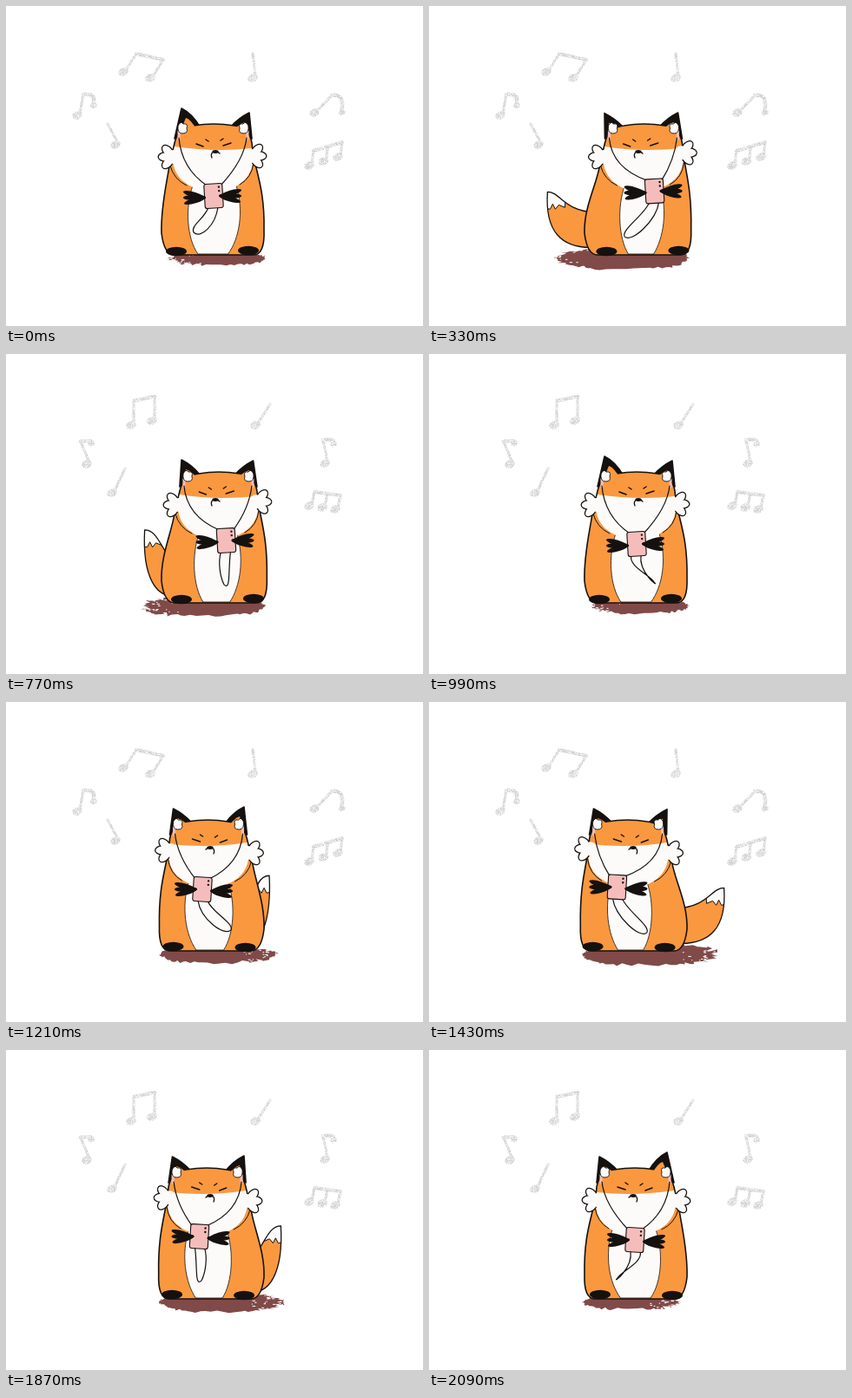
An HTML page with a canvas for the animation above (2200 ms loop, 480 by 369 pixels).

```html
<!DOCTYPE html>
<html lang="en">
<head>
<meta charset="utf-8">
<title>Fox with music</title>
<style>
html, body { margin: 0; width: 100%; height: 100%; overflow: hidden; background: #fff; }
canvas { display: block; width: 100vw; height: 100vh; }
</style>
</head>
<body>
<canvas id="stage" width="480" height="369"></canvas>
<script>
const ctx = document.getElementById('stage').getContext('2d');
const STEP = 110, STEPS = 20, HALF = 10, MIRROR = 476;
const ORANGE = '#fa983f', INK = '#15110f', WHITE = '#fcfbfa', PINK = '#f4bdbb', EARTH = '#804a49';

// One sway to the right; the second half of the loop is its mirror image.
function poseAt(k) {
  const lean = Math.sin(Math.PI * (k / 9) ** 0.9) ** 0.8 || 0;
  const swing = Math.PI * k / HALF;
  const tuftL = 187 + 9 * lean, tuftR = 288 + 9 * lean;
  return {
    lean, tuftL, tuftR,
    tuftLift: 4 * lean,
    headL: tuftL + 7, headR: tuftR - 5,
    earL: 202, earLTop: 118 + 6 * lean,
    earR: 280 + 7 * lean, earRTop: 123,
    eyes: 240 + 5 * lean, nose: 241,
    phoneX: 239 + 22 * lean, phoneY: 219 - 6 * lean,
    belly: 239 + 6 * lean, bellyW: 30 - 5 * lean,
    baseL: 180, baseR: 297 + 5 * lean,
    cordX: 238 - 22 * Math.cos(swing), cordY: 261 + 6 * Math.sin(swing),
    tailX: 215 - 84 * lean, tailY: 199 + 20 * lean ** 4,
    shadowL: 184 - 48 * lean
  };
}

function seeded(seed) {
  return () => (seed = (seed * 16807) % 2147483647) / 2147483647;
}

function paint(path, fill, stroke, width = 1.3) {
  if (typeof path === 'string') path = new Path2D(path);
  if (fill) { ctx.fillStyle = fill; ctx.fill(path); }
  if (stroke) { ctx.strokeStyle = stroke; ctx.lineWidth = width; ctx.stroke(path); }
}

function oval(x, y, rx, ry, turn = 0) {
  const path = new Path2D();
  path.ellipse(x, y, rx, ry, turn, 0, Math.PI * 2);
  return path;
}

// Chalky grey used for the notes
function makeChalk() {
  const tile = document.createElement('canvas');
  tile.width = tile.height = 64;
  const c = tile.getContext('2d'), rnd = seeded(71);
  for (let y = 0; y < 64; y++) for (let x = 0; x < 64; x++) {
    const v = Math.round(204 + 44 * rnd());
    c.fillStyle = `rgb(${v},${v},${v})`;
    c.fillRect(x, y, 1, 1);
  }
  return ctx.createPattern(tile, 'repeat');
}
const chalk = makeChalk();

const chalkHead = (x, y, r = 6) => paint(oval(x, y, r, r * 0.75, -0.4), chalk);

// A note with its head at x, y and a stem rising by h and leaning sideways
function stem(x, y, lean, h) {
  chalkHead(x, y);
  paint(`M${x + 3} ${y - 2}L${x + 3 + lean} ${y - h}`, null, chalk, 3.2);
}

function flagged(x, y, lean, h, drop) {
  stem(x, y, lean, h);
  const tx = x + 3 + lean, ty = y - h;
  paint(`M${tx} ${ty}q16 -2 11 ${drop}`, null, chalk, 4.5);
  chalkHead(tx + 12, ty + drop, 4);
}

function beamed(x, y, count, gap, fall, lean, h) {
  for (let i = 0; i < count; i++) stem(x + gap * i, y + fall * i, lean, h);
  const w = gap * (count - 1);
  paint(`M${x + 3 + lean} ${y - h}l${w} ${fall * (count - 1)}`, null, chalk, 4);
}

function notesLow() {
  beamed(135, 76, 2, 31, 7, 12, 21);
  stem(284, 83, -3, 28);
  flagged(82, 126, 4, 24, 13);
  stem(126, 160, -12, 24);
  flagged(355, 123, 17, 20, 20);
  beamed(349, 184, 3, 16.5, -5, 2, 17);
}

function notesHigh() {
  beamed(144, 82, 2, 24, -5, 0, 28);
  stem(287, 82, 14, 24);
  flagged(93, 127, -10, 26, 2);
  stem(122, 160, 12, 28);
  flagged(367, 126, -5, 27, 5);
  beamed(349, 175, 3, 15, 2, 3, 16);
}

function drawShadow({ shadowL, lean }, step) {
  const rnd = seeded(500 + step * 37);
  const right = 300, mid = (shadowL + right) / 2, rx = (right - shadowL) / 2;
  const cy = 291, ry = 8 + 5 * lean, n = 90;
  const path = new Path2D();
  for (let i = 0; i < n; i++) {
    const a = i / n * Math.PI * 2, cos = Math.cos(a), rough = cos < -0.2 ? 0.18 : 0.06;
    const r = 1 - rough * rnd();
    path.lineTo(mid + rx * Math.sign(cos) * Math.abs(cos) ** 0.7 * r,
      cy + ry * Math.sin(a) * r + (rnd() - 0.5) * 3);
  }
  path.closePath();
  paint(path, EARTH);
  ctx.fillStyle = '#fff';
  for (let i = 0; i < 50; i++) {
    const x = shadowL + rx * 0.7 * rnd() * rnd();
    ctx.fillRect(x, cy - ry + 2 * ry * rnd(), 1 + 2.5 * rnd(), 1);
  }
}

function drawTail({ tailX: x, tailY: y }) {
  const path = new Path2D(`M195 278C${x + 14} 282 ${x - 3} 258 ${x} ${y}
    C${x + 15} ${y} ${x + 18} ${y + 22} 192 238Z`);
  paint(path, ORANGE);
  ctx.save();
  ctx.clip(path);
  ctx.translate(x, y);
  paint('M-8 -8L-6 18L3 20L6 14L9 20L13 15L20 18L22 -8Z', WHITE, INK, 1);
  ctx.restore();
  paint(path, null, INK);
}

function drawEar(x, y, edge, s) {
  paint(`M${edge} 153L${x} ${y}Q${x + s * 12} ${y + 6} ${x + s * 21} 139Z`, INK, INK, 1.6);
}

function drawEarInside(x, y, edge, s) {
  paint(`M${edge + s * 3} 154L${x + s * 5} ${y + 11}Q${x + s * 11} ${y + 13} ${x + s * 17} 142L${edge + s * 12} 153Z`, ORANGE);
  paint(`M${edge + s * 5} 144l0 9`, null, PINK, 3);
  ctx.save();
  ctx.translate(edge + s * 9, 141);
  ctx.scale(s, 1);
  paint('M-5 -3Q-2 -9 1 -5Q7 -6 5 0Q7 6 0 6Q-6 6 -5 -3Z', WHITE, INK, 0.9);
  ctx.restore();
}

function drawBody({ headL, headR, baseL, baseR, nose, belly, bellyW }) {
  const mid = (headL + headR) / 2;
  paint(`M${headL} 158Q${headL + 4} 140 ${headL + 22} 138Q${mid} 134 ${headR - 20} 138
    Q${headR - 3} 140 ${headR} 158C${headR + 2} 188 ${baseR + 1} 205 ${baseR} 258
    Q${baseR + 1} 287 ${baseR - 12} 287L${baseL + 14} 287Q${baseL + 2} 287 ${baseL - 1} 262
    C${baseL - 2} 232 ${headL - 9} 205 ${headL - 6} 184Z`, ORANGE, INK, 1.6);

  const l = belly - bellyW, r = belly + bellyW;
  paint(`M${l + 6} 207C${l - 3} 232 ${l - 1} 268 ${belly - bellyW * 0.6} 286
    L${belly + bellyW * 0.55} 286C${r} 268 ${r + 5} 236 ${r - 4} 207Z`, WHITE, INK, 0.8);
  paint(`M${headL} 162Q${nose} 169 ${headR} 164C${headR + 8} 200 ${headR - 22} 214 ${nose} 214
    C${headL + 22} 214 ${headL - 10} 200 ${headL} 162Z`, WHITE);
  paint(`M${headL - 5} 184Q${headL - 1} 200 ${headL + 14} 207
    M${headR + 2} 181Q${headR} 198 ${headR - 14} 206`, null, INK, 1);
}

function drawFoot(x, y) {
  paint(oval(x, y, 12, 5.2), INK);
}

function drawTuft(x, y, s) {
  const lobes = [-1, 0, 1].map(i =>
    oval(x + s * (i * i * 3 - 4), y + 2 + i * 7, 7.2, 4.4, -s * i * 0.8));
  lobes.forEach(lobe => paint(lobe, null, INK, 2.6));
  lobes.forEach(lobe => paint(lobe, WHITE));
  paint(oval(x + s * 6, y + 2, 8, 8), WHITE);
}

function drawFace({ eyes, nose }) {
  paint(`M${eyes - 21} 159l8 3M${eyes + 10} 161l9 -3M${eyes - 10} 154l3 2M${eyes + 10} 153l-3 2`, null, INK, 1.5);
  paint(oval(nose, 168, 3.6, 1.9), INK);
  paint(`M${nose + 5} 170Q${nose + 2} 167 ${nose - 2} 168Q${nose - 6} 170 ${nose - 4} 175`, null, INK, 1.3);
}

function drawCord({ headL, headR, phoneX: x, phoneY: y, cordX, cordY }) {
  paint(`M${headL + 5} 152Q${headL + 8} 187 ${x - 8} ${y - 12}
    M${headR - 6} 152Q${headR - 9} 178 ${x + 8} ${y - 12}`, null, INK, 1.2);
  paint(`M${x + 5} ${y + 13}C${x + 2} ${y + 34} ${cordX + 8} ${cordY + 8} ${cordX} ${cordY}
    C${cordX - 4} ${cordY - 8} ${x - 10} ${y + 26} ${x - 6} ${y + 13}`, null, INK, 1.2);
}

function drawPhone(x, y, flip) {
  ctx.save();
  ctx.translate(x, y);
  ctx.rotate(-0.06);
  const path = new Path2D();
  path.roundRect(-10.5, -14, 21, 28, 2.5);
  paint(path, PINK, INK, 1.1);
  const dx = flip ? -6.5 : 6.5;
  [-10, -5.5].forEach(dy => paint(oval(dx, dy, 1.2, 1.2), INK));
  ctx.restore();
}

function drawHand(x, y, s) {
  for (let i = -1; i <= 1; i++)
    paint(oval(x + s * i * 0.5, y + i * 3.2, 13, 3.2, -s * i * 0.3), INK);
}

function drawFox(p, flip) {
  drawTail(p);
  drawEar(p.earL, p.earLTop, p.headL, 1);
  drawEar(p.earR, p.earRTop, p.headR, -1);
  drawBody(p);
  drawEarInside(p.earL, p.earLTop, p.headL, 1);
  drawEarInside(p.earR, p.earRTop, p.headR, -1);
  drawFoot(p.headL + 2, 283);
  drawFoot(p.headR - 4, 282);
  drawTuft(p.tuftL, 172, 1);
  drawTuft(p.tuftR, 171 - p.tuftLift, -1);
  drawFace(p);
  drawCord(p);
  drawPhone(p.phoneX, p.phoneY, flip);
  drawHand(p.phoneX - 22, p.phoneY + 2, 1);
  drawHand(p.phoneX + 19, p.phoneY, -1);
}

function render(step) {
  const flip = step >= HALF, k = step % HALF, p = poseAt(k);
  ctx.fillStyle = '#fff';
  ctx.fillRect(0, 0, 480, 369);
  ctx.lineCap = ctx.lineJoin = 'round';
  if (k < HALF / 2) notesLow(); else notesHigh();
  ctx.save();
  if (flip) { ctx.translate(MIRROR, 0); ctx.scale(-1, 1); }
  drawShadow(p, step);
  drawFox(p, flip);
  ctx.restore();
}

const start = performance.now();
let shown = -1;
function tick() {
  const step = Math.floor((performance.now() - start) / STEP) % STEPS;
  if (step !== shown) render(shown = step);
  requestAnimationFrame(tick);
}
tick();
</script>
</body>
</html>
```
